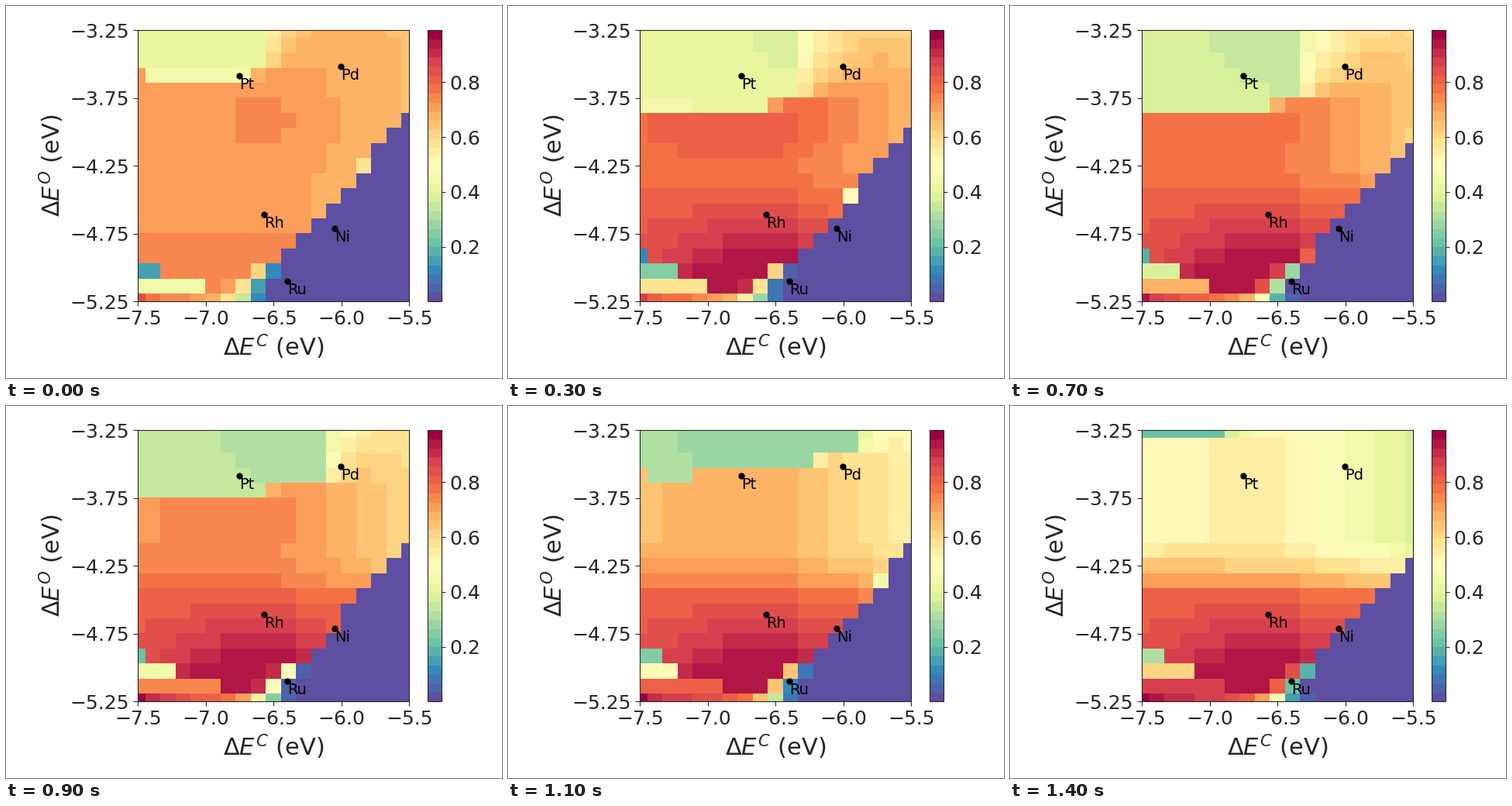
These frames come from a looping animation (640x480 px, 1.5 s). A matplotlib script:

```python
import numpy as np
import matplotlib.pyplot as plt
from matplotlib.animation import FuncAnimation

N = 19                       # grid points per axis, row 0 at the top
FRAMES, STEP = 15, 100
LAST = (FRAMES - 1) * STEP
INK = "0.15"

row, col = np.mgrid[:N, :N].astype(float)
cols = np.arange(N)


def progress(t, start, end, power=1):
    return np.clip((t - start) / (end - start), 0, 1) ** power


def background(t):
    """Early flat field turning into a cooling top over a hot bottom."""
    hump = np.exp(-((col - 9) / 5) ** 2 - ((row - 6) / 2.5) ** 2)
    early = .705 + .03 * np.maximum(hump, row > 13)
    drop = .15 * np.clip((col - 9) / 9, 0, 1)

    top = .82 - .29 * progress(t, 300, LAST, 2.3) - .03 * np.clip(1 - col / 5, 0, 1)
    low = .80 + .03 * (row - 11) * np.minimum(1.1, .35 + col / 8)
    mix = np.clip((row - 7.2) / 3.8, 0, 1)
    late = top + (np.minimum(low, .95) - top) * mix - drop * (1 - .6 * mix)

    grown = progress(t, 0, 300)
    return (early - drop / 3) * (1 - grown) + late * grown


def add_plateau(grid, t):
    """Low block at the top left, with a soft edge to its right."""
    u = t / LAST
    depth = 4.1 + 2.1 * progress(t, 0, 300) - 5.4 * progress(t, 700, LAST, 1.3)
    widest = np.interp(t, [0, 300, 700, 1100], [9, 11, 11, 15])
    blur = 1.5 + 3.5 * np.sin(np.pi * min(1, t / 1000))
    for r in range(int(np.ceil(depth))):
        width = int(min(widest, 8 * (depth - r)))
        if width == 0:
            continue
        fill = .42 - .19 * u ** 2 + .06 * (1 - u) * (r / depth) ** 3 - .002 * cols
        is_last = 8 * (depth - r - 1) < 1
        start = int(is_last and r > 0)
        grid[r, start:width] = fill[start:width]
        reach = blur * (1 - r / depth)
        fade = np.exp(-(cols[width:] - width + 1) / reach)
        grid[r, width:] += (fill[width:] - grid[r, width:]) * fade


def add_front(grid, ease):
    """Zero region at the lower right; cells it has just left stay pale."""
    for r in range(4, 16):
        place = 24 + 2.17 * ease + .12 * r
        whole = min(27, int(place))
        edge = whole - r
        if edge <= N:
            grid[r, edge:] = 0
            grid[r, edge - 1] *= min(1, .65 + 2.5 * (place - whole))


def add_bottom(grid, t, ease):
    u = t / LAST
    grid[18] = np.minimum(.98, .77 + .17 * u - .015 * cols + .08 * np.exp(-cols))
    for r, width, value in (
            (15, progress(t, 0, 300) * (1 + 1.3 * u), .12 + .2 * u ** 2),
            (16, 2.7 + 1.4 * u, .15 + .46 * u),
            (17, 5 + 1.6 * u, .45 + .42 * u ** .8)):
        grid[r, :int(width)] = value
    for r, center, soft in (16, 8.5, .3), (17, 7.5, .35), (18, 7.1, .6):
        grid[r] /= 1 + np.exp((cols - center - 2.1 * ease) / soft)


def field(t):
    ease = (t / LAST) ** .75
    grid = background(t)
    add_plateau(grid, t)
    add_front(grid, ease)
    add_bottom(grid, t, ease)
    return grid


plt.rcParams.update({
    "font.family": "DejaVu Sans", "axes.edgecolor": INK,
    "axes.labelcolor": INK, "xtick.color": INK, "ytick.color": INK,
    "xtick.labelsize": 18, "ytick.labelsize": 18, "axes.labelsize": 22,
    "xtick.major.size": 4.5, "ytick.major.size": 4.5,
})

fig = plt.figure(figsize=(6.4, 4.8), dpi=100, facecolor="white")


def place_axes(x, y, w, h):
    return fig.add_axes([x / 640, 1 - (y + h) / 480, w / 640, h / 480])


ax = place_axes(170.3, 31.3, 350, 350)
bar = place_axes(544.3, 31.3, 18, 350)

half = 1 / (N - 1)
image = ax.imshow(field(0), cmap=plt.get_cmap("Spectral_r", 30), vmin=0, vmax=.99,
                  extent=(-7.5 - half, -5.5 + half, -5.25 - half, -3.25 + half),
                  interpolation="nearest", aspect="auto")
ax.set(xlim=(-7.5, -5.5), ylim=(-5.25, -3.25),
       xticks=np.arange(-7.5, -5.4, .5), yticks=np.arange(-5.25, -3.2, .5),
       xlabel=r"$\Delta E^C$ (eV)", ylabel=r"$\Delta E^O$ (eV)")
fig.colorbar(image, cax=bar, ticks=[.2, .4, .6, .8])
bar.tick_params(length=3.5)

METALS = {"Pt": (-6.751, -3.587), "Pd": (-6.003, -3.519), "Rh": (-6.569, -4.610),
          "Ni": (-6.049, -4.713), "Ru": (-6.397, -5.101)}
for name, (x, y) in METALS.items():
    ax.plot(x, y, "o", color="black", ms=6, mew=0)
    ax.annotate(name, (x, y), xytext=(0, -12.2), textcoords="offset points",
                fontsize=14, color="black", va="baseline")


def draw(n):
    image.set_data(field(n * STEP))
    return [image]


anim = FuncAnimation(fig, draw, frames=FRAMES, interval=STEP, repeat=True,
                     repeat_delay=0)
plt.show()
```
